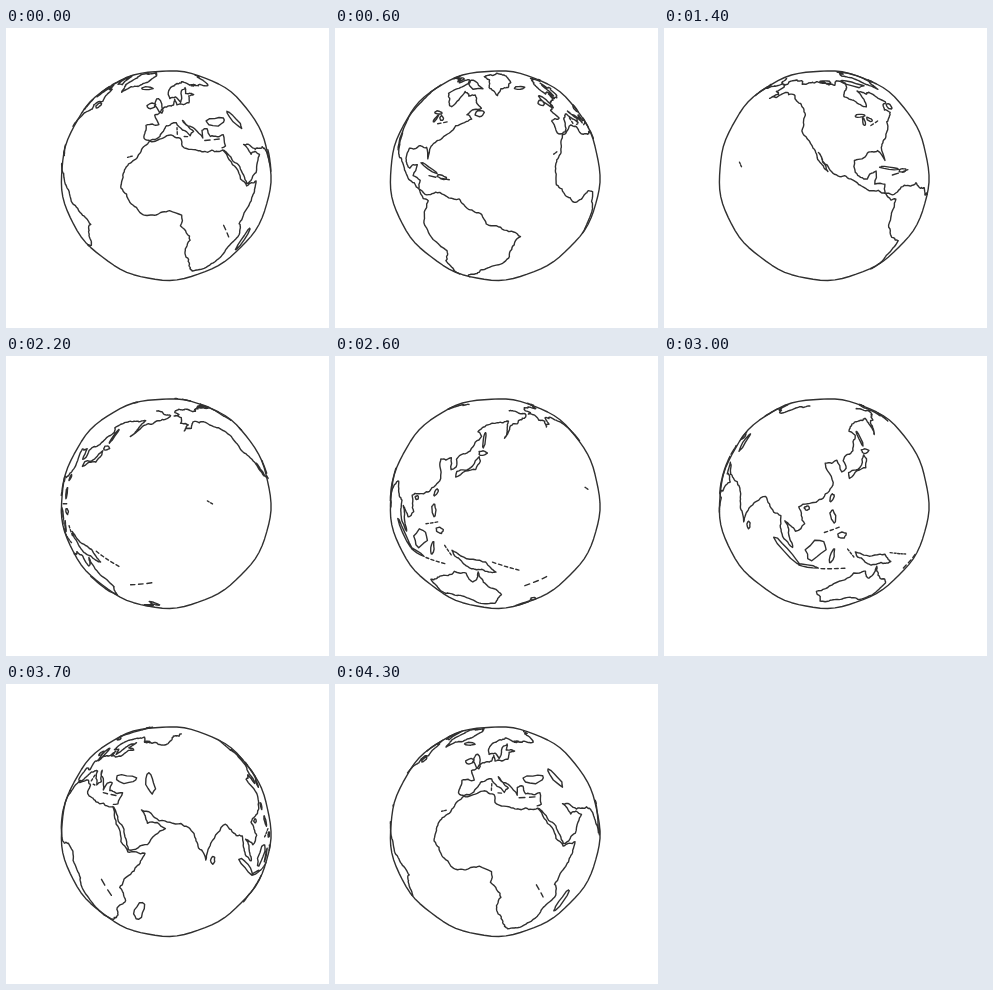
An HTML page for the animation above (4.4 s loop, 323 by 300 pixels).

```html
<!DOCTYPE html>
<html lang="en">
<head>
<meta charset="utf-8">
<title>Hand-drawn turning globe</title>
<style>
  html, body { margin: 0; width: 100%; height: 100%; overflow: hidden; background: #fff; }
  svg { display: block; width: 100%; height: 100%; }
  path { fill: none; stroke: #303030; stroke-width: 1.4; stroke-linecap: round; stroke-linejoin: round; }
</style>
</head>
<body>
<svg viewBox="0 0 323 300"><path id="rim"/><path id="coasts"/></svg>
<script>
const CENTER = { x: 160, y: 147 }, RADIUS = 105;
const RAD = Math.PI / 180;
const TILT = 21.5 * RAD;   // latitude facing the viewer
const DISTANCE = 3.8;      // viewer distance in globe radii
const START_LONGITUDE = 2.8;
const STEPS = 44, STEP_MS = 100;

// Capes and bays that fix each coast, as "longitude,latitude"; the pen adds the rest.
const capes = {
  africa: "32.5,30 20,31 11,33.6 10.5,37 -5.6,35.8 -9.6,31 -17,21 -17.5,14.7 -13,9 -7.6,4.4 4.3,6.3 9.5,4 9,-1 "
    + "13.6,-9 11.8,-17 15,-27 18.4,-34.2 26,-34 32.8,-27 35,-20 40.6,-14 39,-6 44,1.2 51,11.8 43.3,11.6 32.5,30",
  southAsia: "32.5,30 34.9,28 43.5,12.7 52,15.6 59.8,22.5 56,25 51.5,24.5 48,30 57,25.7 67,24.5 72.7,20 77.5,8 "
    + "80.2,15 89,22 94.3,16 98,15 98.5,8 103.7,1.4 100,13 105,9 109,12.5 106,19.5 110,21",
  eastAsia: "110,21 117,23.5 121.8,30 119.3,35 118,38.6 124.5,39.9 126.5,34.5 129,36 128,39.5 135,44 140.5,52 "
    + "137,54.5 143,59 163,61.5 156.7,51 163,58 179,63 188,66 170,70",
  southEurope: "32.5,31 35,31.5 36,36.7 27.5,36.8 27,40.5 23.5,40 22.8,36.5 19.4,41 13,45.5 18.4,40 16,38 9,44.4 "
    + "3.1,43 -.5,38 -5.6,36",
  northEurope: "-5.6,36 -9,37 -9,43 -1.4,43.6 -4.6,48.3 8.5,54 10,57.5 11,54 21,55 23.5,59.3 29,60 21.5,61 "
    + "24.5,65.5 17,61 14.3,55.5 11,59 6,58 5,62 15,68.5 26,71 41,67 34,66.5 44,66 67,69 72,73 90,75",
  westAmerica: "-125,70 -156,71 -166,68.5 -162,66.5 -168,65.6 -161,64 -164,60 -157.5,58.6 -163,55 -151,60.5 "
    + "-140,59.7 -130,54.5 -124,48.2 -124.2,40.3 -117.2,32.7 -110,23 -114.5,31 -105.5,21 -95,16 -87,13 -80.5,7.3 -77.5,7",
  eastAmerica: "-79.5,9.5 -83.5,11 -83.2,15 -88.5,16 -87,21.4 -90.5,20.5 -92,18.6 -97.4,22 -97.2,27 -90,29.5 -84,30 "
    + "-81,25.2 -81.2,31 -75.8,35.5 -70,42 -65,44 -61,46 -65,48 -56,52 -64.5,60 -70,59 -77,62 -77,56 -79.5,51.5 "
    + "-94,59 -86,65 -82,69 -95,71 -98,68 -125,70",
  southAmerica: "-77.5,7 -80,0 -81,-5 -76,-14 -70.4,-18.4 -73.5,-38 -75,-50 -68,-54 -66,-46 -62,-39 -57,-36 "
    + "-48.7,-27 -41,-22 -38.5,-13 -35,-7 -50,0 -52,4.5 -62,10.5 -71.5,12 -75.5,10.7 -79.5,9.5",
  greenland: "-44,60 -53,66 -55,73 -70,77 -40,83 -20,78 -24,70 -40,65 -44,60",
  australia: "142.5,-10.8 146,-18.8 153.5,-27 150,-37.5 140,-38 131,-31.5 118,-35 115,-34 113.5,-24 122,-18 131,-12.2 "
    + "136.8,-12.2 139.5,-17.5 142.5,-10.8",
  newGuinea: "131,-.8 135,-3 146,-5 150.5,-10.5 138,-8.3 133,-4 131,-.8",
  japan: "130,31.5 140,35.5 142,39.5 141,41.5 138,37 130,34 130,31.5"
};

function noise(seed) {
  const value = Math.sin(seed * 12.9898) * 43758.5453;
  return (value - Math.floor(value)) * 2 - 1;
}

// Splits a line until it is short, nudging each middle sideways.
function roughen(from, to, out) {
  const dx = to[0] - from[0], dy = to[1] - from[1];
  if (Math.hypot(dx, dy) < 1.5) { out.push(to); return; }
  const bend = noise(from[0] * 1.7 + to[1] * 3.1 + dx) * 0.13;
  const middle = [from[0] + dx / 2 - dy * bend, from[1] + dy / 2 + dx * bend];
  roughen(from, middle, out);
  roughen(middle, to, out);
}

function coast(text) {
  const points = text.split(" ").map(point => point.split(",").map(Number));
  const line = [points[0]];
  points.slice(1).forEach((point, i) => roughen(points[i], point, line));
  return line;
}

// An uneven oval for an island or a lake; slant is in degrees from east.
function oval(longitude, latitude, length, width = length, slant = 0) {
  const line = [], turn = slant * RAD, corners = 12;
  for (let i = 0; i <= corners; i++) {
    const a = i / corners * 2 * Math.PI;
    const wobble = 1 + 0.22 * noise(longitude + latitude + i % corners);
    const u = length * wobble * Math.cos(a), v = width * wobble * Math.sin(a);
    line.push([
      longitude + (u * Math.cos(turn) - v * Math.sin(turn)) / Math.cos(latitude * RAD),
      latitude + u * Math.sin(turn) + v * Math.cos(turn)
    ]);
  }
  return line;
}

// A row of small islets drawn as dashes
function chain(fromLongitude, fromLatitude, toLongitude, toLatitude, count) {
  const at = share => [
    fromLongitude + (toLongitude - fromLongitude) * share,
    fromLatitude + (toLatitude - fromLatitude) * share
  ];
  return Array.from({ length: count }, (_, i) => [at(i / count), at((i + 0.55) / count)]);
}

const lines = [
  ...Object.values(capes).map(coast),
  // Europe and Africa
  oval(-2.8, 54, 4, 1.5, 110), oval(-8, 53.4, 1.7, 1.4), oval(-18.5, 65, 2.6, 1.1),
  oval(35, 43.3, 5, 1.9), oval(51, 42, 5, 1.7, 105), oval(46.8, -19, 6.8, 2.2, 70),
  ...chain(9, 39, 9.2, 43, 2), ...chain(12.6, 37.8, 16, 37.6, 1), ...chain(23.6, 35.3, 35, 35, 2),
  ...chain(-16, 28, -13, 29, 2), ...chain(29.5, -4, 35, -14, 2),
  // Asia and Oceania
  oval(80.8, 7.6, 1.8, 1, 90), oval(100.5, -0.2, 7.5, 1.2, -47), oval(110, -7.4, 4.6, 0.6, -6),
  oval(114, 1, 5.2, 3.3, 50), oval(120.8, -2, 3.5, 0.8, 80), oval(121.2, 16, 2.6, 1, 100),
  oval(125, 7.5, 1.8, 1.3), oval(121, 23.6, 1.6, 0.7, 70), oval(109.8, 19.2, 1.1, 0.8),
  oval(143, 43.3, 1.8, 1.2), oval(142.8, 50, 4, 0.5, 90),
  oval(175.5, -38.5, 3, 1.2, -50), oval(170.5, -43.8, 3.8, 1.2, 45),
  ...chain(116, -8.5, 128, -8.8, 4), ...chain(127.5, 1, 131, -4, 3), ...chain(117.5, 9, 125, 11.5, 3),
  ...chain(149, -5, 162, -10.5, 5), ...chain(165, -21, 178, -17, 3), ...chain(-158, 21.3, -155, 19.3, 2),
  // The Americas
  oval(-79.5, 21.5, 5, 0.5, -17), oval(-71.3, 18.8, 2.4, 0.8, -8), ...chain(-78.3, 18.2, -64, 18.2, 2),
  oval(-88, 47.2, 2.4, 0.7), oval(-86.7, 43.8, 2, 0.6, 80), oval(-82.3, 44.8, 1.4, 0.8, -40),
  ...chain(-83, 41.7, -75, 43.8, 2), oval(-56.5, 49, 2, 1.5),
  oval(-74, 68, 6, 2, 140), oval(-110, 71, 2.5, 1.5)
];

function project([longitude, latitude], centerLongitude) {
  const turn = (longitude - centerLongitude) * RAD, lat = latitude * RAD;
  const forward = Math.cos(lat) * Math.cos(turn);
  const depth = Math.sin(TILT) * Math.sin(lat) + Math.cos(TILT) * forward;
  if (depth < 1 / DISTANCE) return null;
  const scale = RADIUS * Math.sqrt(DISTANCE ** 2 - 1) / (DISTANCE - depth);
  return [
    CENTER.x + scale * Math.cos(lat) * Math.sin(turn),
    CENTER.y - scale * (Math.cos(TILT) * Math.sin(lat) - Math.sin(TILT) * forward)
  ];
}

const pair = ([x, y]) => x.toFixed(1) + " " + y.toFixed(1);

function coastPath(centerLongitude) {
  let path = "";
  for (const line of lines) {
    let drawing = false;
    for (const point of line) {
      const spot = project(point, centerLongitude);
      if (spot) path += (drawing ? "L" : "M") + pair(spot);
      drawing = !!spot;
    }
  }
  return path;
}

// One wavering round of the pen
function rimPath() {
  let path = "";
  for (let degrees = 0; degrees <= 360; degrees += 4) {
    const a = degrees * RAD;
    const r = RADIUS - 0.3 + 0.5 * Math.sin(5 * a) + 0.4 * Math.sin(13 * a + 1);
    path += (degrees ? "L" : "M") + pair([CENTER.x + r * Math.cos(a), CENTER.y + r * Math.sin(a)]);
  }
  return path;
}

const coasts = document.getElementById("coasts");
document.getElementById("rim").setAttribute("d", rimPath());

const startTime = performance.now();
let shownStep = -1;

function draw() {
  const step = Math.floor((performance.now() - startTime) / STEP_MS) % STEPS;
  if (step !== shownStep) {
    shownStep = step;
    coasts.setAttribute("d", coastPath(START_LONGITUDE - step * 360 / STEPS));
  }
  requestAnimationFrame(draw);
}
draw();
</script>
</body>
</html>
```
